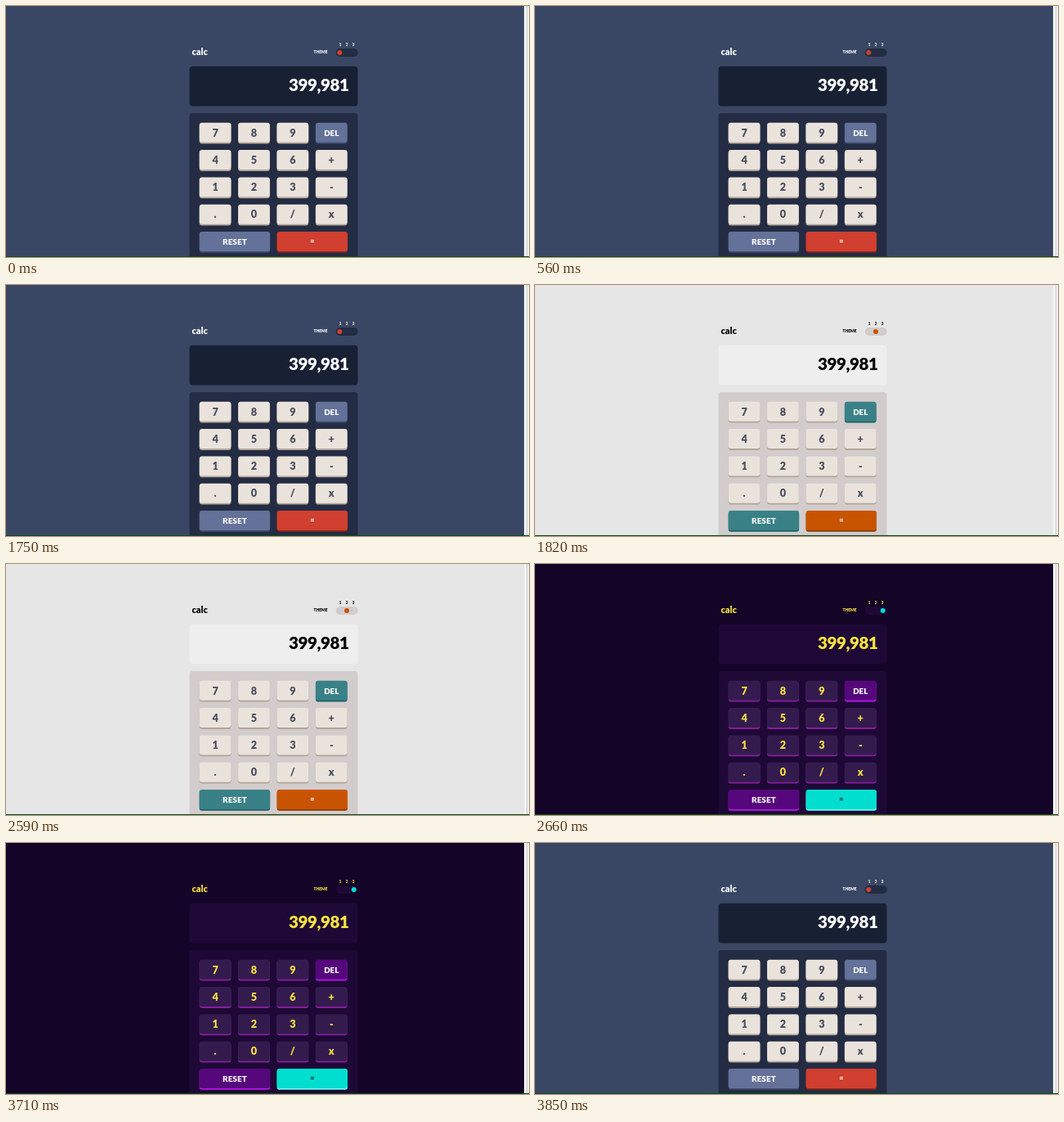
An HTML page with a canvas that plays this animation: 640 px wide and 307 px high, repeating every 3.92 s.

```html
<!DOCTYPE html>
<html lang="en">
<head>
<meta charset="utf-8">
<title>Calculator themes</title>
<style>
  html, body { margin: 0; width: 100%; height: 100%; overflow: hidden; }
  canvas { display: block; width: 640px; height: 307px; }
</style>
</head>
<body>
<canvas id="stage" width="640" height="307"></canvas>
<script>
const ctx = document.getElementById('stage').getContext('2d');
const LOOP = 3920;

const themes = [
  {
    start: 0, knobX: 408.3,
    page: '#3a4764', screen: '#182034', pad: '#232c43', toggle: '#232c43',
    text: '#ffffff', knob: '#d03f2f',
    key: ['#eae3dc', '#b4a597', '#444b5a'],
    action: ['#647198', '#414e73', '#ffffff'],
    equals: ['#d03f2f', '#93261a', '#ffffff']
  },
  {
    start: 1820, knobX: 417,
    page: '#e6e6e6', screen: '#eeeeee', pad: '#d2cccc', toggle: '#d2cccc',
    text: '#000000', knob: '#c85402',
    key: ['#eae3dc', '#b4a597', '#444b5a'],
    action: ['#3a8187', '#1b6066', '#ffffff'],
    equals: ['#c85402', '#873901', '#ffffff']
  },
  {
    start: 2660, knobX: 425.7,
    page: '#140427', screen: '#1e0936', pad: '#1e0936', toggle: '#1e0936',
    text: '#ffe53d', knob: '#00ded0',
    key: ['#331c4d', '#881c9e', '#ffe53d'],
    action: ['#56077c', '#be15f4', '#ffffff'],
    equals: ['#00ded0', '#6cf9f1', '#1b2428']
  },
];
themes.push({ ...themes[0], start: 3780 });

const keyRows = [['7', '8', '9', 'DEL'], ['4', '5', '6', '+'], ['1', '2', '3', '-'], ['.', '0', '/', 'x']];

function box(x, y, w, h, r, color) {
  ctx.fillStyle = color;
  ctx.beginPath();
  ctx.roundRect(x, y, w, h, r);
  ctx.fill();
}

function label(text, x, y, size, color, align = 'center') {
  ctx.font = `900 ${size}px Lato, sans-serif`;
  ctx.textAlign = align;
  ctx.fillStyle = color;
  ctx.fillText(text, x, y);
}

function button(text, x, y, w, size, [face, edge, ink]) {
  box(x, y + 1, w, 24.8, 3, edge);
  box(x, y, w, 24, 3, face);
  label(text, x + w / 2, y + 12.2 + size * 0.36, size, ink);
}

function drawHeader(t) {
  label('calc', 227.5, 59.6, 11, t.text, 'left');
  label('THEME', 376.5, 58.3, 4.9, t.text, 'left');
  ['1', '2', '3'].forEach((n, i) => label(n, 409 + i * 8, 49.4, 4.5, t.text));
  box(403.7, 52, 27, 10, 5, t.toggle);
  ctx.fillStyle = t.knob;
  ctx.beginPath();
  ctx.arc(t.knobX, 57, 3, 0, Math.PI * 2);
  ctx.fill();
}

function drawKeypad(t) {
  box(224.5, 131, 206, 190, 4, t.pad);
  keyRows.forEach((row, r) => row.forEach((text, c) => {
    const isDelete = text === 'DEL';
    button(text, 236.7 + c * 47.4, 142.8 + r * 33.3, 38.7,
      isDelete ? 9.8 : 12.6, isDelete ? t.action : t.key);
  }));
  button('RESET', 236.7, 276, 86.4, 10, t.action);
  button('=', 331.6, 276, 86.4, 9, t.equals);
}

function drawFrame() {
  ctx.fillStyle = '#f3f2f3';
  ctx.fillRect(634, 0, 6, 307);
  ctx.fillStyle = '#c9c8ca';
  ctx.fillRect(637, 0, 1, 307);
  ctx.fillStyle = '#0b4a1c';
  ctx.fillRect(0, 306, 640, 1);
}

function render(now) {
  const time = now % LOOP;
  const theme = themes.findLast(t => time >= t.start);
  ctx.fillStyle = theme.page;
  ctx.fillRect(0, 0, 640, 307);
  drawHeader(theme);
  box(224.5, 73.7, 206, 48.8, 4, theme.screen);
  ctx.letterSpacing = '-0.4px';
  label('399,981', 419.5, 104, 20.5, theme.text, 'right');
  ctx.letterSpacing = '0px';
  drawKeypad(theme);
  drawFrame();
}

const origin = performance.now();
function tick() {
  render(performance.now() - origin);
  requestAnimationFrame(tick);
}
tick();
</script>
</body>
</html>
```
